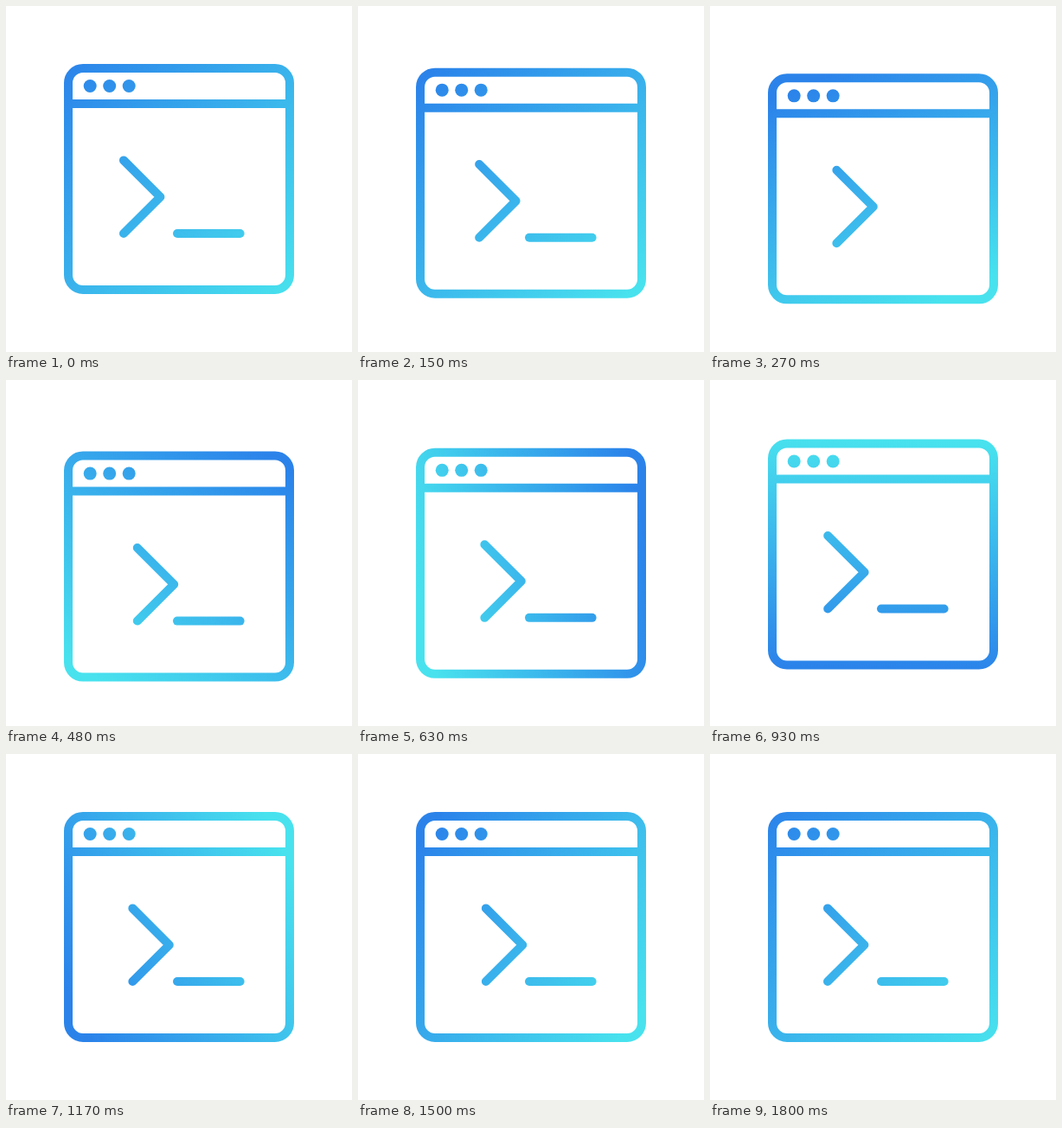
Animation of 400 by 400 pixels, one loop 3830 ms. Source, as an HTML page with a canvas:

```html
<!DOCTYPE html>
<html lang="en">
<head>
<meta charset="utf-8">
<title>Terminal window</title>
<style>
  html, body { margin: 0; width: 100%; height: 100%; overflow: hidden; background: #fff; }
  canvas { display: block; width: 400px; height: 400px; }
</style>
</head>
<body>
<canvas id="stage"></canvas>
<script>
const LOOP = 3830, STEP = 30, STEPS = 60;
const LOW = 67, HIGH = 333;
const canvas = document.getElementById('stage');
const ctx = canvas.getContext('2d');
const ratio = window.devicePixelRatio || 1;
canvas.width = canvas.height = 400 * ratio;

const clamp = v => Math.min(1, Math.max(0, v));
const smooth = v => { v = clamp(v); return v * v * (3 - 2 * v); };
// Rises from step a to b, then falls back until step c
const bump = (n, a, b, c) =>
  n < b ? smooth((n - a) / (b - a)) : 1 - smooth((n - b) / (c - b));

// Cubic Bezier easing with handles (x1, 0) and (x2, 1)
function ease(x, x1, x2) {
  let lo = 0, hi = 1;
  for (let i = 0; i < 24; i++) {
    const s = (lo + hi) / 2, r = 1 - s;
    if (3 * r * r * s * x1 + 3 * r * s * s * x2 + s * s * s < x) lo = s;
    else hi = s;
  }
  return smooth(lo);
}

// Point on the window's outline, one side per unit, clockwise from top left
function corner(u) {
  u = (u + 4) % 4;
  const side = Math.floor(u);
  const d = (HIGH - LOW) * (u - side);
  return [[LOW + d, LOW], [HIGH, LOW + d], [HIGH - d, HIGH], [LOW, HIGH - d]][side];
}

function paint(u) {
  const g = ctx.createLinearGradient(...corner(u), ...corner(u + 2));
  g.addColorStop(0, '#2b83ea');
  g.addColorStop(1, '#48e2ee');
  return g;
}

function line(...points) {
  ctx.beginPath();
  points.forEach(([x, y]) => ctx.lineTo(x, y));
  ctx.stroke();
}

function draw(n) {
  const lift = 16 * bump(n, 0, 14, 35);
  const push = 16 * (n < 30 ? bump(n, 0, 15, 30) : bump(n, 30, 45, 60));
  const cursorOn = n < 7 || n >= 14;

  ctx.setTransform(ratio, 0, 0, ratio, 0, 0);
  ctx.fillStyle = '#fff';
  ctx.fillRect(0, 0, 400, 400);
  ctx.translate(0, lift);
  ctx.strokeStyle = ctx.fillStyle = paint(4 * ease(n / STEPS, 0.333, 0.5));
  ctx.lineWidth = 10;
  ctx.lineJoin = 'round';

  ctx.beginPath();
  ctx.roundRect(72, 72, 256, 256, 17);
  ctx.stroke();
  ctx.lineCap = 'butt';
  line([72, 113], [328, 113]);

  for (const x of [97.2, 119.7, 142.2]) {
    ctx.beginPath();
    ctx.arc(x, 92.5, 7.5, 0, Math.PI * 2);
    ctx.fill();
  }

  ctx.lineCap = 'round';
  line([136 + push, 178.4], [178.4 + push, 220.7], [136 + push, 263]);
  if (cursorOn) line([198, 263], [270.6, 263]);
}

const start = performance.now();
function tick() {
  const t = (performance.now() - start) % LOOP;
  draw(Math.min(STEPS, Math.floor(t / STEP)));
  requestAnimationFrame(tick);
}
tick();
</script>
</body>
</html>
```
